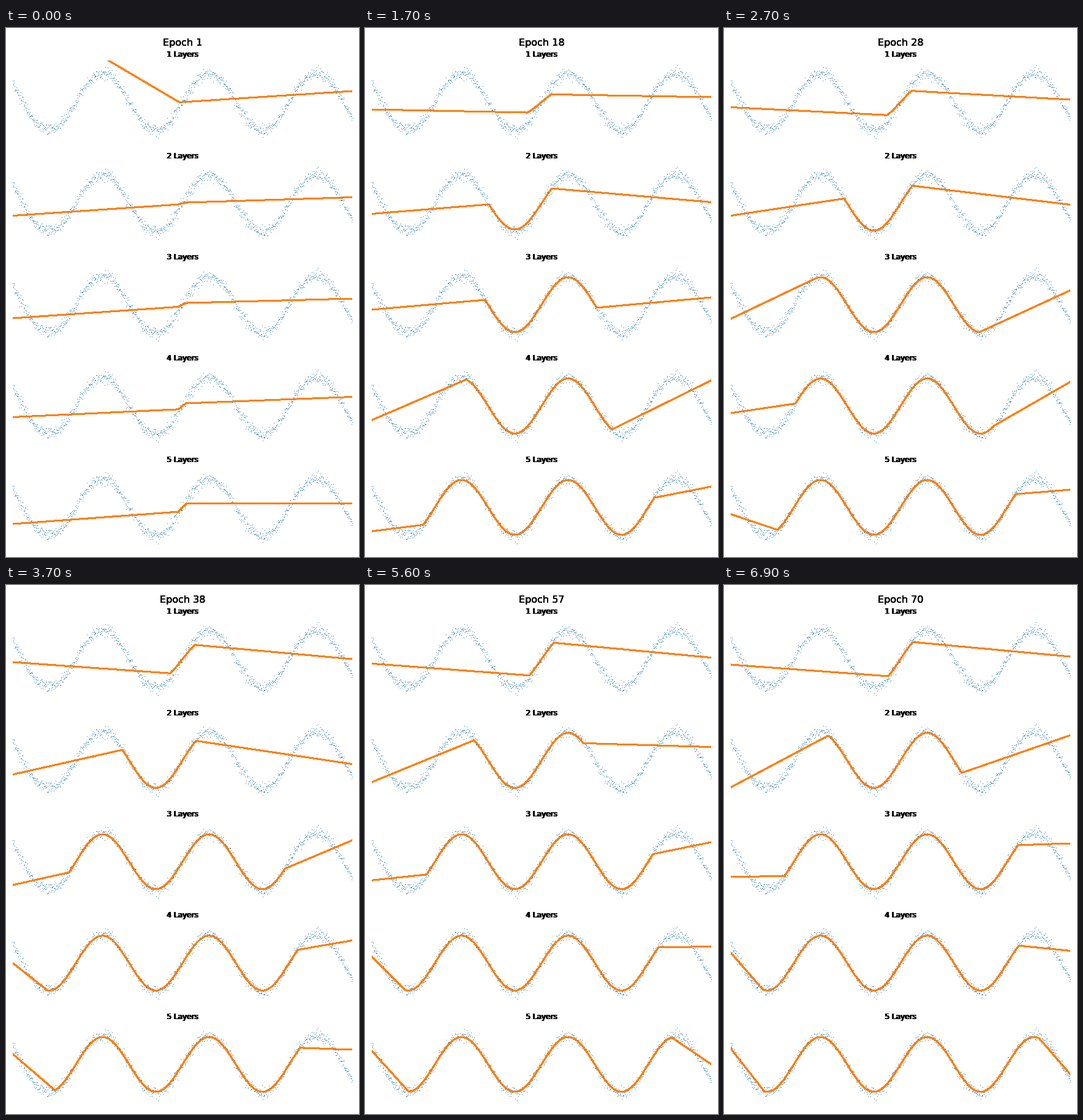
Write a matplotlib script that moves like this. It is 576 px wide and 864 px high and loops after 7 s.

```python
import matplotlib.pyplot as plt
import numpy as np
from matplotlib.animation import FuncAnimation
from matplotlib.patches import Rectangle

W, H, DPI = 576, 864, 72
LEFT, RIGHT = 11, 565
ROW_STEP = 165.5
EPOCHS = 70

# Each fit follows the sine between two joints and runs straight to its ends.
# Per layer, at the key epochs: joint x and end height, on the left and right.
KEYS = [1, 18, 38, 70]
LAYERS = [
    [(283, 265, 268, 268), (-160, 12, 5, 9), (291, 304, 308, 308), (-18, -8, 0, -4)],
    [(281, 202, 190, 170), (20, 17, 23, 44), (294, 305, 310, 388), (-10, -2, 6, -41)],
    [(281, 196, 103, 99), (22, 8, 38, 25), (294, 378, 455, 480), (-10, -12, -35, -30)],
    [(281, 165, 68, 64), (18, 23, 0, -17), (294, 403, 476, 481), (-15, -42, -37, -20)],
    [(281, 95, 80, 66), (27, 39, -17, -26), (294, 472, 480, 514), (-6, -34, -24, 16)],
]


def center(row):
    return 121 + ROW_STEP * row


def wave(x, amp):
    """Sine offset in stage pixels, y pointing down."""
    return -amp * np.sin((x - 288) / 27.7)


grid = np.linspace(LEFT, RIGHT, RIGHT - LEFT + 1)


def fit(row, epoch):
    """Curve learned by the net of one row after the given epoch."""
    # learning is fastest at the start
    t = epoch
    if epoch < KEYS[1]:
        t = 1 + np.sqrt((epoch - 1) * (KEYS[1] - 1))
    x0, y0, x1, y1 = (np.interp(t, KEYS, track) for track in LAYERS[row])
    depth = row + 1
    amp = 45 * (1 - np.exp(-epoch * depth ** 2 / 25))
    core = np.linspace(x0, x1, 60)
    xs = np.concatenate([[LEFT], core, [RIGHT]])
    ys = np.concatenate([[y0], wave(core, amp), [y1]])
    return center(row) + np.interp(grid, xs, ys)


plt.rcParams["font.family"] = "DejaVu Sans"
fig = plt.figure(figsize=(W / DPI, H / DPI), dpi=DPI, facecolor="white")
ax = fig.add_axes([0, 0, 1, 1])
ax.set_xlim(0, W)
ax.set_ylim(H, 0)
ax.axis("off")


def label(y, text, size, shifts=(0,)):
    """Stack copies so that the soft edges turn solid."""
    return [ax.text(W / 2 + dx, y, text, size=size, ha="center", va="baseline")
            for dx in shifts for _ in range(5)]


rng = np.random.RandomState(0)
noise = rng.normal(0, 4.7, 1000)
xs = np.linspace(LEFT, RIGHT, noise.size)

heading = label(29, "Epoch 1", 16)
lines = []
for row in range(len(LAYERS)):
    top = 53 + ROW_STEP * row
    label(top - 6, f"{row + 1} Layers", 12, shifts=(-0.5, 0.5))
    ax.plot(xs, center(row) + wave(xs, 47) - noise, ",", color="tab:blue")
    line, = ax.plot(grid, fit(row, 1), color="tab:orange", lw=2,
                    antialiased=False)
    line.set_clip_path(Rectangle((LEFT, top), RIGHT - LEFT, 136,
                                 transform=ax.transData))
    lines.append(line)


def draw(i):
    for row, line in enumerate(lines):
        line.set_ydata(fit(row, i + 1))
    for text in heading:
        text.set_text(f"Epoch {i + 1}")
    return lines + heading


anim = FuncAnimation(fig, draw, frames=EPOCHS, interval=100, repeat=True,
                     repeat_delay=0, blit=False)
plt.show()
```
